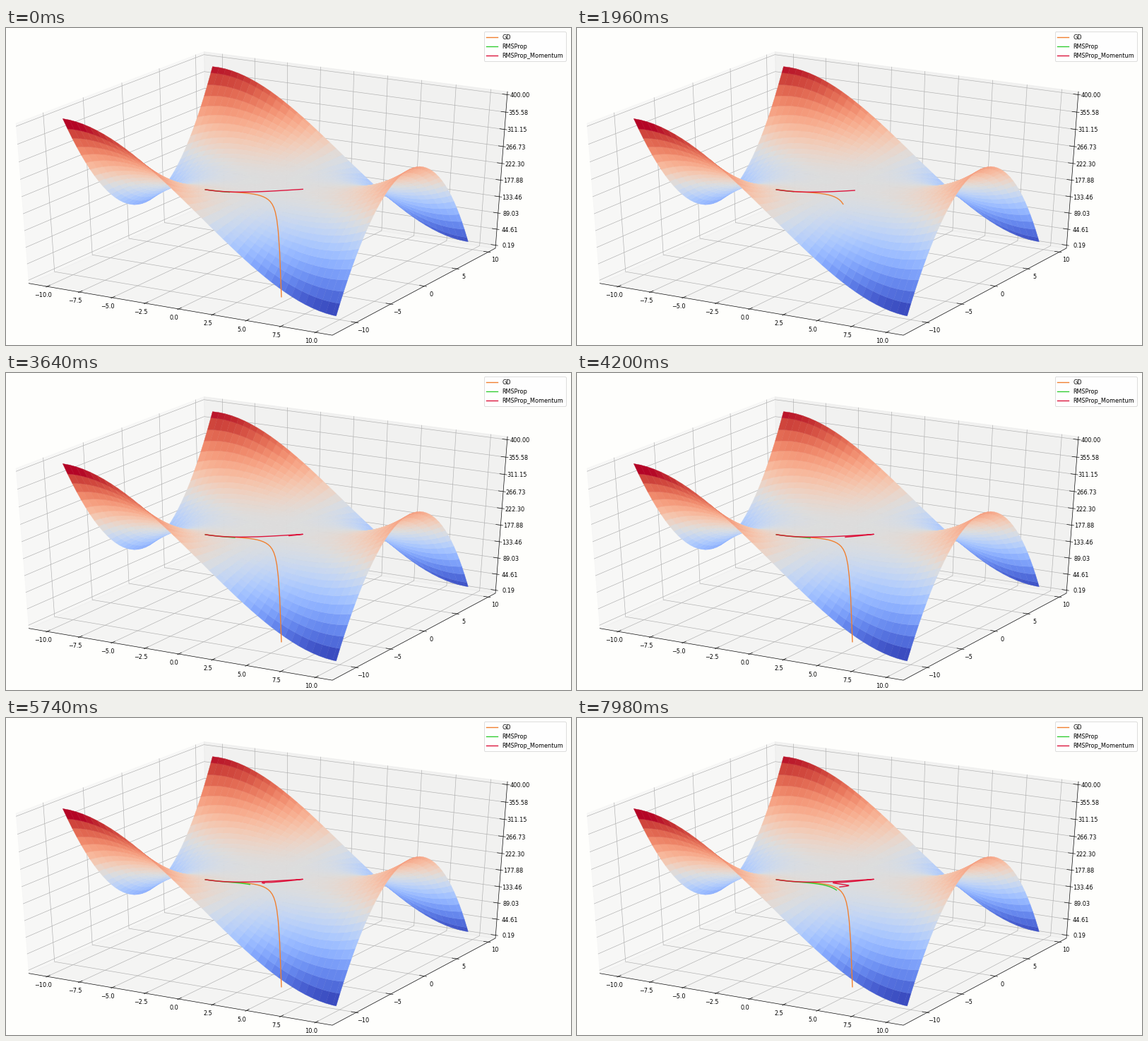
A matplotlib script for the animation above (8000 ms loop, 800x449 px).

```python
import numpy as np
import matplotlib.pyplot as plt
from matplotlib.animation import FuncAnimation
from matplotlib.collections import LineCollection, PolyCollection

WIDTH, HEIGHT, DPI = 800, 449, 58.5
INTERVAL, FRAMES = 40, 200
STEPS, DETAIL = 56, 8        # optimizer steps, curve samples per step
EDGE = 0.5 + 1 / 48          # half side of the box around the unit cube
LOW = np.array([-10.9875, -12.858, 0.1856])
SPAN = np.array([21.725, 23.525, 399.8144])
START = np.array([-2.5, -5.0])

plt.rcParams.update({"font.family": "DejaVu Sans", "font.size": 10})


def project(points):
    """Perspective view (azimuth -60, elevation 30) to pixels and distance."""
    x, y, z = np.moveaxis(np.asarray(points, float), -1, 0)
    c, s = np.sqrt(3) / 2, 0.5
    right = c * x + s * y
    up = s * (-s * x + c * y) + c * z
    distance = 10 - (c * (s * x - c * y) + s * z)
    pixels = np.stack([367.8 + 4765 * right / distance,
                       227 - 2488 * up / distance], axis=-1)
    return pixels, distance


def pixels(*points):
    return project(points)[0]


def normal(value, axis):
    return (value - LOW[axis]) / SPAN[axis] - 0.5


def saddle(x, y):
    return 0.1 * (x**3 - 3 * x * y**2) + 200


def slope(p):
    x, y = p
    return np.array([0.3 * (x**2 - y**2), -0.6 * x * y])


def on_surface(x, y):
    return project(np.stack([normal(x, 0), normal(y, 1),
                             normal(saddle(x, y), 2)], axis=-1))


fig = plt.figure(figsize=(WIDTH / DPI, HEIGHT / DPI), dpi=DPI, facecolor="#fefefc")
ax = fig.add_axes([0, 0, 1, 1])
ax.set_xlim(0, WIDTH)
ax.set_ylim(HEIGHT, 0)
ax.axis("off")


def draw_box():
    e = EDGE
    panes = [
        (0.95, [(-e, -e, -e), (-e, e, -e), (-e, e, e), (-e, -e, e)]),
        (0.90, [(-e, e, -e), (e, e, -e), (e, e, e), (-e, e, e)]),
        (0.925, [(-e, -e, -e), (e, -e, -e), (e, e, -e), (-e, e, -e)]),
    ]
    for grey, corners in panes:
        color = (grey, grey, grey, 0.5)
        ax.add_collection(PolyCollection([pixels(*corners)], facecolors=[color],
                                         edgecolors=[color], linewidths=1, zorder=0))

    grid, marks = [], []
    out, inward = 0.1 / 12, 0.2 / 12

    def label(anchor, offset, text):
        px, py = pixels(anchor)[0] + offset
        ax.text(px, py, text.replace("-", "\u2212"), ha="center", va="center")

    for value in np.arange(-10, 10.1, 2.5):
        x = normal(value, 0)
        grid.append(pixels((x, -e, -e), (x, e, -e), (x, e, e)))
        marks.append(pixels((x, -e - out, -e), (x, -e + inward, -e)))
        label((x, -e, -e), (-6.2, 12.8), f"{value:.1f}")
    for value in range(-10, 11, 5):
        y = normal(value, 1)
        grid.append(pixels((e, y, -e), (-e, y, -e), (-e, y, e)))
        marks.append(pixels((e + out, y, -e), (e - inward, y, -e)))
        label((e, y, -e), (9.5, 11.6), str(value))
    for value in np.linspace(LOW[2], 400, 10):
        z = normal(value, 2)
        grid.append(pixels((-e, -e, z), (-e, e, z), (e, e, z)))
        marks.append(pixels((e + out, e, z), (e - inward, e, z)))
        label((e, e, z), (17.8, 1.3), f"{value:.2f}")

    spine = pixels((-e, -e, -e), (e, -e, -e), (e, e, -e), (e, e, e))
    ax.add_collection(LineCollection(grid, colors="#b0b0b0", linewidths=0.8,
                                     zorder=0.2))
    ax.add_collection(LineCollection(marks + [spine], colors="black",
                                     linewidths=0.8, zorder=0.4))


def draw_surface():
    side = np.append(np.arange(-10, 9.6, 0.5), 9.75)
    x, y = np.meshgrid(side, side)
    points, distance = on_surface(x, y)

    def cells(a):
        quads = np.stack([a[:-1, :-1], a[:-1, 1:], a[1:, 1:], a[1:, :-1]], axis=2)
        return quads.reshape(-1, *quads.shape[2:])

    order = np.argsort(-cells(distance).mean(axis=1))
    height = cells(saddle(x, y)).mean(axis=1)[order]
    colors = plt.cm.coolwarm((height - height.min()) / np.ptp(height))
    ax.add_collection(PolyCollection(cells(points)[order], facecolors=colors,
                                     edgecolors=colors, linewidths=0.5, zorder=1))


def descend(rate, steps, decay=None):
    """Gradient descent; with a decay the step is scaled by the running RMS."""
    p = START
    square = slope(p) @ slope(p)
    path = [p]
    for _ in range(steps):
        g = slope(p)
        if decay is None:
            p = p - rate * g
        else:
            square = decay * square + (1 - decay) * (g @ g)
            p = p - rate * g / np.sqrt(square)
        path.append(p)
    return np.array(path)


def swing():
    """The momentum run: it overshoots the saddle, returns and turns again."""
    knots = np.array([0, 7, 20, 29, 36, 47, 55])
    places = np.array([START, (-0.85, -2.95), (2.1, -0.1), (0.8, -1.63),
                       (0.2, -2.2), (1.35, -2.2), (1.0, -2.8)])
    speed = np.gradient(places, knots, axis=0)
    t = np.arange(55 * DETAIL + 1) / DETAIL
    i = np.clip(np.searchsorted(knots, t, side="right") - 1, 0, len(knots) - 2)
    h = (knots[i + 1] - knots[i])[:, None]
    u = (t - knots[i])[:, None] / h
    return ((1 + 2 * u) * (1 - u)**2 * places[i] + u * (1 - u)**2 * h * speed[i]
            + u**2 * (3 - 2 * u) * places[i + 1] + u**2 * (u - 1) * h * speed[i + 1])


draw_box()
draw_surface()

# Name, colour, path on the surface, path points per step.
RUNS = [
    ("GD", "#f08030", descend(0.1007, 20), 1),
    ("RMSProp", "limegreen", descend(0.1, STEPS, decay=0.9), 1),
    ("RMSProp_Momentum", "crimson", swing(), DETAIL),
]
trails = [(on_surface(*path.T)[0], density) for _, _, path, density in RUNS]
lines = [ax.plot([], [], color=color, lw=1.7, label=name, zorder=5)[0]
         for name, color, _, _ in RUNS]
ax.legend(handles=lines, loc="upper right", bbox_to_anchor=(796.6, 1.2),
          bbox_transform=ax.transData)


def update(frame):
    slot = (2 * frame + 1) // 7                 # the picture changes every 140 ms
    step = slot - (slot >= 20) - (slot >= 37)   # two steps are held twice as long
    if slot == 0:
        step = 20                               # opens on a late state, then restarts
    for line, (trail, density) in zip(lines, trails):
        line.set_data(*trail[:step * density + 1].T)
    return lines


animation = FuncAnimation(fig, update, frames=FRAMES, interval=INTERVAL,
                          repeat=True, repeat_delay=0)
plt.show()
```
